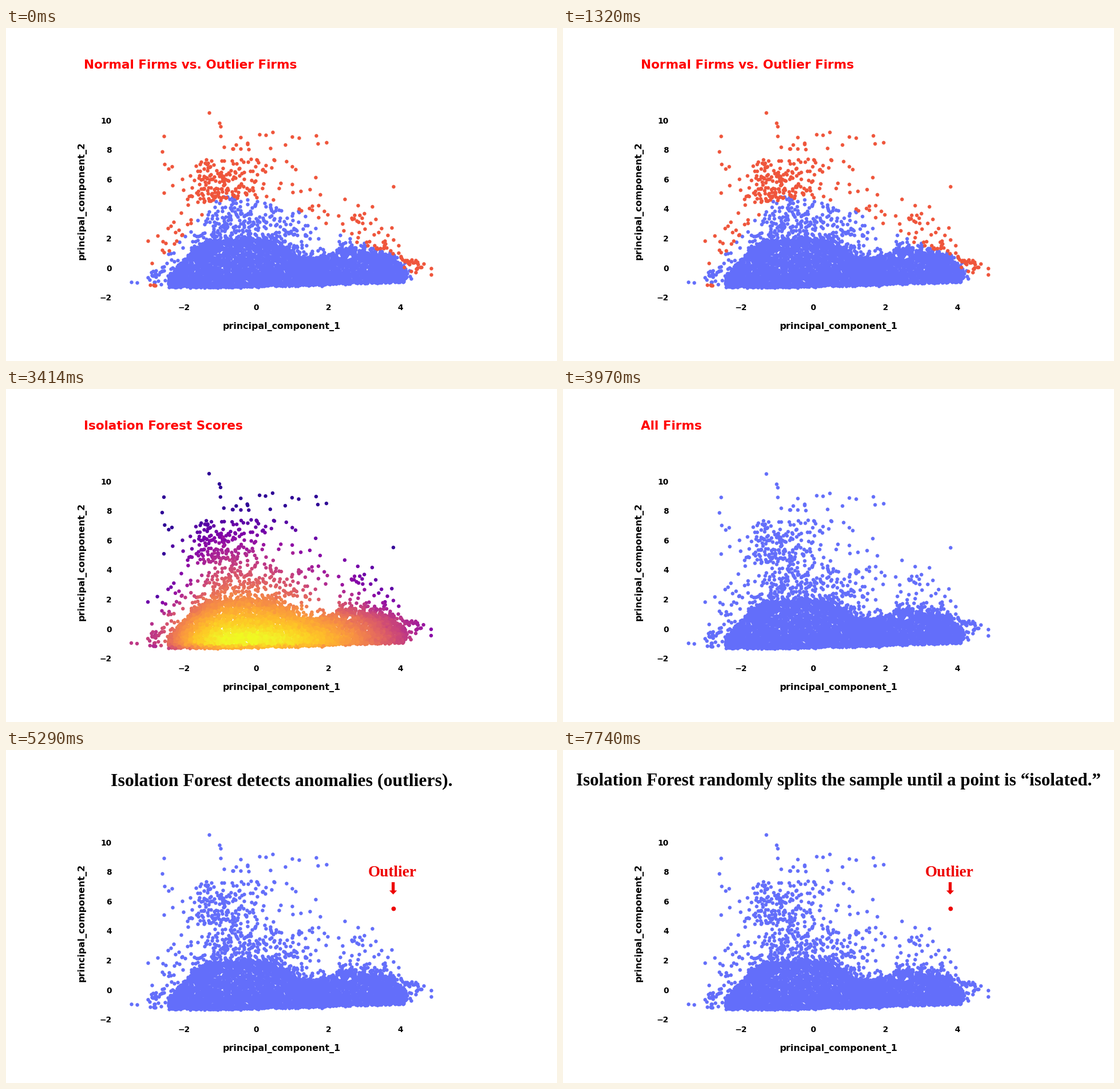
Write a matplotlib script that moves like this. It is 963 by 582 pixels and loops after 8000 ms.

```python
import numpy as np
import matplotlib.pyplot as plt
from matplotlib.animation import FuncAnimation

W, H, DPI = 963, 582, 100
LOOP, STEP = 8000, 20
BLUE, ORANGE, RED, SIGNAL = "#636efa", "#ef553b", "#ff0000", "#ee0000"
DOT = 6.4
TARGET = (677, 277)

rng = np.random.default_rng(7)


def pt(px):
    return px * 72 / DPI


def hump(x, centre, width, power):
    return np.exp(-np.abs((x - centre) / width) ** power)


def ridge(x):
    """Height of the dense mass above its floor."""
    return (74 * hump(x, 395, 95, 4) + 38 * hump(x, 530, 65, 2)
            + 44 * hump(x, 630, 65, 4) + 8)


def floor(x):
    return 452.5 - 9 * np.clip((x - 420) / 275, 0, 1)


def mass(n, left, right):
    x = rng.uniform(left, right, n)
    y = floor(x) - ridge(x) * rng.random(n) ** 1.25 + rng.normal(0, 1, n)
    return np.column_stack([x, y])


def fringe(n, left, right, depth):
    x = rng.uniform(left, right, n)
    y = floor(x) - ridge(x) + 6 - rng.exponential(depth, n)
    return np.column_stack([x, y])


def band(n, centre, spread, top, bottom, lean=1):
    """Points between two heights; a lean above 1 crowds the bottom."""
    x = rng.normal(centre, spread, n)
    return np.column_stack([x, bottom - (bottom - top) * rng.random(n) ** lean])


def score(x, y):
    """Isolation score from 0 (outlier) to 1 (normal)."""
    rise = 432 - y
    left = np.maximum(1 - 0.6 * ((x - 400) / 145) ** 2, 0.46)
    right = 1 - 0.6 * ((x - 400) / 315) ** 2
    across = np.where(x < 400, left, right)
    down = 1 - np.maximum(rise, 0) / 240 - 0.025 * np.maximum(y - 445, 0)
    power = 1 + np.clip((rise - 32) / 40, 0, 1.5)
    noise = rng.normal(0, 0.012, x.size)
    return np.clip(down * across ** power + noise, 0.06, 1)


# The loneliest points around the cloud
loners = np.array([
    TARGET, (355, 148), (373, 166), (375, 172), (276, 189), (273, 216),
    (290, 242), (276, 288), (466, 182), (500, 190), (542, 188), (545, 202),
    (560, 200), (488, 204), (531, 282), (549, 291), (592, 299), (640, 312),
    (219, 444), (229, 445), (743, 420), (743, 431)])

points = np.vstack([
    mass(3500, 284, 560),
    mass(1300, 540, 695),
    fringe(190, 290, 560, 10),
    fringe(110, 580, 700, 14),
    band(370, 390, 37, 228, 378, 1.3),   # plume above the mass
    band(34, 345, 13, 236, 310),
    band(14, 415, 32, 185, 212),
    band(130, 482, 30, 308, 392, 1.4),   # right shoulder
    band(14, 485, 35, 225, 310),
    band(28, 630, 28, 318, 385, 1.4),
    band(30, 286, 14, 335, 430, 1.5),    # left and right ends
    band(26, 264, 9, 424, 451),
    band(38, 708, 14, 405, 439)])
points[:, 0] = np.clip(points[:, 0], 248, 740)
points = np.vstack([points, loners])
px, py = points.T
scores = score(px, py)
odd = scores < 0.43

fig = plt.figure(figsize=(W / DPI, H / DPI), dpi=DPI, facecolor="white")
ax = fig.add_axes([0, 0, 1, 1])
ax.set(xlim=(0, W), ylim=(H, 0))
ax.axis("off")


def dots(mask, color):
    return ax.plot(px[mask], py[mask], "o", ms=pt(DOT), mew=0, color=color)[0]


def label(x, y, s, size, color="black", ha="center", va="baseline",
          font="DejaVu Sans", **kw):
    return ax.text(x, y, s, fontsize=pt(size), color=color, ha=ha, va=va,
                   family=font, weight="bold", **kw)


def title(s):
    return label(136, 71.3, s, 21.5, RED, ha="left")


def headline(s, size):
    return label(481.5, 62, s, size, font="Liberation Serif")


def tick(x, y, value, ha="center"):
    label(x, y, str(value).replace("-", "\u2212"), 13.7, ha=ha)


for v in range(-2, 5, 2):
    tick(437 + 63.1 * v, 493, v)
for v in range(-2, 11, 2):
    tick(185, 424.6 - 25.8 * v, v, ha="right")
label(481.5, 525.5, "principal_component_1", 15.9)
label(141, 301.5, "principal_component_2", 15.9, ha="right", va="center",
      rotation=90)

blue_all = dots(scores >= 0, BLUE)
blue_normal = dots(~odd, BLUE)
orange_odd = dots(odd, ORANGE)
scored = ax.scatter(px, py, c=scores, cmap="plasma", vmin=0, vmax=1,
                    s=pt(DOT) ** 2, linewidths=0)

arrow = ax.fill([674, 679.3, 679.3, 683.3, 676.7, 670, 674],
                [231, 231, 245.5, 245.5, 252.5, 245.5, 245.5],
                color=SIGNAL, lw=0)[0]
target = ax.plot(*TARGET, "o", ms=pt(7.8), mew=0, color=SIGNAL)[0]
callout = [label(675.5, 221, "Outlier", 27.3, SIGNAL, font="Liberation Serif"),
           arrow, target]

split_view = [blue_normal, orange_odd, title("Normal Firms vs. Outlier Firms")]
score_view = [scored, title("Isolation Forest Scores")]
SCENES = [
    (0, split_view),
    (530, score_view),
    (1320, split_view),
    (2580, score_view),
    (3970, [blue_all, title("All Firms")]),
    (5290, [blue_all, *callout,
            headline("Isolation Forest detects anomalies (outliers).", 31.8)]),
    (7740, [blue_all, *callout,
            headline("Isolation Forest randomly splits the sample until "
                     "a point is \u201cisolated.\u201d", 31.05)]),
]
STARTS = [start for start, _ in SCENES]
ACTORS = {artist for _, scene in SCENES for artist in scene}


def update(i):
    time = (i + 0.5) * STEP
    scene = SCENES[np.searchsorted(STARTS, time, side="right") - 1][1]
    for artist in ACTORS:
        artist.set_visible(artist in scene)
    return list(ACTORS)


anim = FuncAnimation(fig, update, frames=LOOP // STEP, interval=STEP,
                     repeat=True, repeat_delay=0, blit=False)
plt.show()
```
